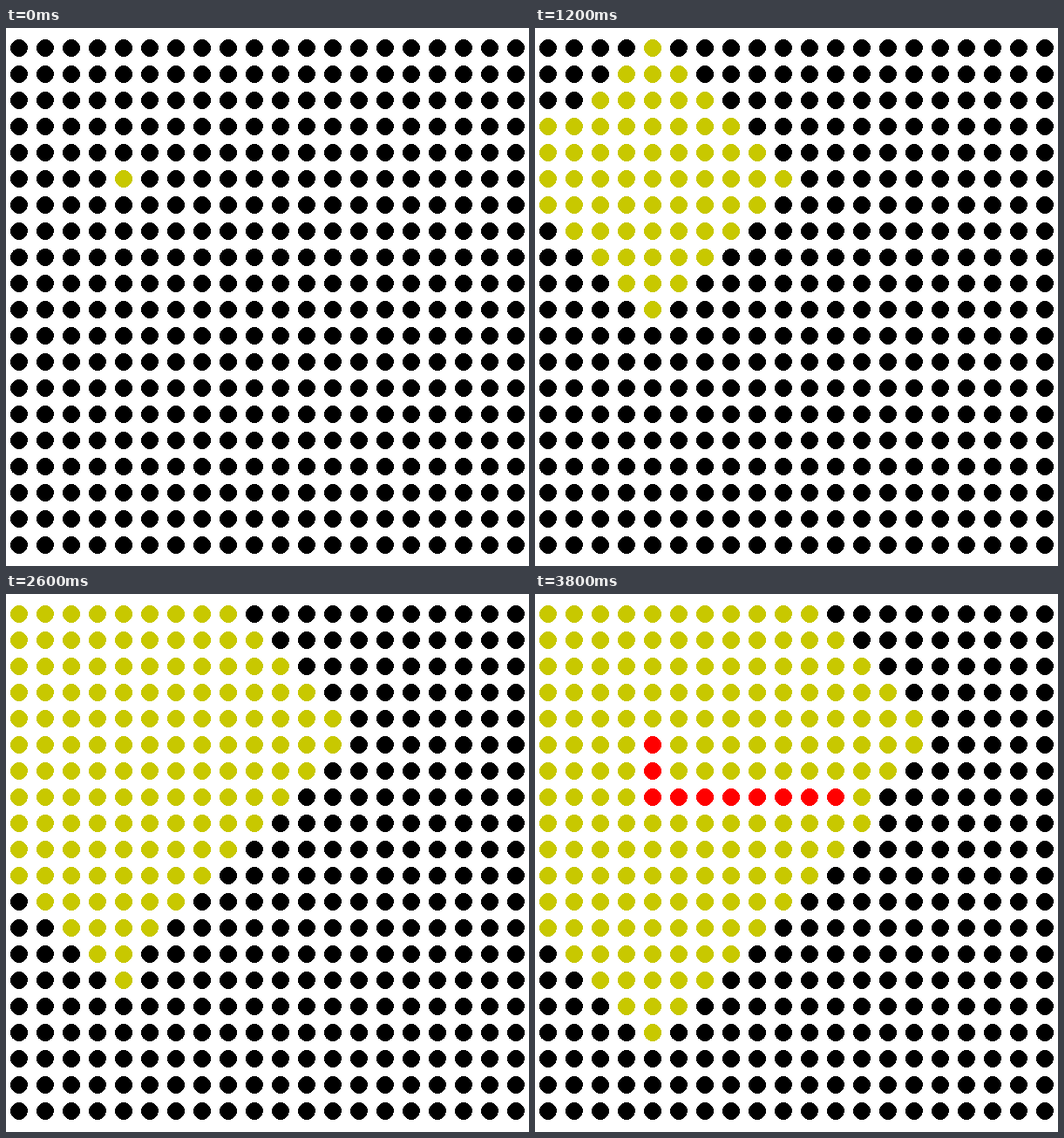
Recreate the animation shown at these times as an HTML page. Size 600x617 px, loop 3900 ms.

```html
<!DOCTYPE html>
<html lang="en">
<head>
<meta charset="utf-8">
<title>Breadth-first search</title>
<style>
  html, body { margin: 0; width: 100%; height: 100%; overflow: hidden; background: #fff; }
  svg { display: block; shape-rendering: crispEdges; }
</style>
</head>
<body>
<svg id="stage" width="600" height="617" viewBox="0 0 600 617"></svg>
<script>
const SIZE = 20, GAP = 30, LOOP = 3900, TICK = 100, PER_TICK = 5;
const PATH_START = 180;
const BLACK = '#000', YELLOW = '#c8c800', RED = '#f00';
const NEIGHBOURS = [[-1, 0], [0, -1], [0, 1], [1, 0]];
const id = (col, row) => row * SIZE + col;
const start = id(4, 5), goal = id(12, 7);

const stage = document.getElementById('stage');
const dots = Array.from({ length: SIZE * SIZE }, (_, i) => {
  const dot = document.createElementNS('http://www.w3.org/2000/svg', 'circle');
  dot.setAttribute('cx', 15 + GAP * (i % SIZE));
  dot.setAttribute('cy', 23 + GAP * Math.floor(i / SIZE));
  dot.setAttribute('r', 10);
  return stage.appendChild(dot);
});

// Returns the cells in order of discovery and the path up to the goal.
function search() {
  const parent = new Map([[start, null]]);
  const queue = [start];
  for (let head = 0; queue[head] !== goal; head++) {
    const cell = queue[head], col = cell % SIZE, row = Math.floor(cell / SIZE);
    for (const [dx, dy] of NEIGHBOURS) {
      const x = col + dx, y = row + dy, next = id(x, y);
      if (x < 0 || y < 0 || x >= SIZE || y >= SIZE || parent.has(next)) continue;
      parent.set(next, cell);
      queue.push(next);
    }
  }
  const path = [];
  for (let c = parent.get(goal); c !== null; c = parent.get(c)) path.unshift(c);
  return { found: queue, path };
}

const { found, path } = search();
let shown = -1;

function draw(now) {
  const step = Math.floor((now % LOOP) / TICK) * PER_TICK;
  if (step !== shown) {
    shown = step;
    const fills = new Array(dots.length).fill(BLACK);
    found.slice(0, step + 1).forEach(c => fills[c] = YELLOW);
    path.slice(0, Math.max(0, step - PATH_START + 1)).forEach(c => fills[c] = RED);
    dots.forEach((dot, i) => dot.setAttribute('fill', fills[i]));
  }
}

const begin = performance.now();
function loop() {
  draw(performance.now() - begin);
  requestAnimationFrame(loop);
}
loop();
</script>
</body>
</html>
```
